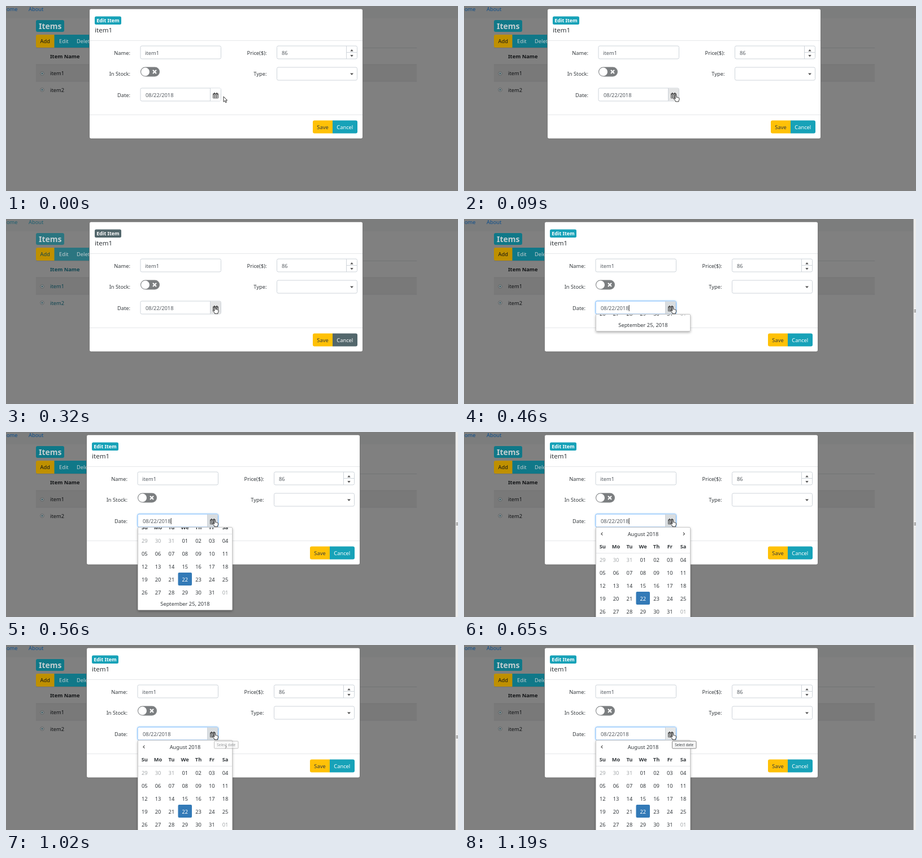
An HTML page that plays this animation: 800x329 px, repeating every 1270 ms.

```html
<!DOCTYPE html>
<html lang="en">
<head>
<meta charset="utf-8">
<title>Edit item dialog</title>
<style>
html, body { margin: 0; width: 100%; height: 100%; overflow: hidden; background: #808080; }
svg { display: block; width: 800px; height: 329px; font: 9.3px "Noto Sans", "Open Sans", sans-serif; fill: #34393d;
  --teal: #17a2b8; --dim: #107888; --link: #0d4e8c; --ink: #101214; }
svg.dull { --teal: #53676c; --dim: #2b7580; --link: #1d5f70; --ink: #0d4450; }
.mid { text-anchor: middle; }
.end { text-anchor: end; }
.bold { font-weight: 700; }
.page { fill: var(--ink); }
.teal { fill: var(--teal); }
.dim { fill: var(--dim); }
.link { fill: var(--link); }
.white { fill: #fff; }
.pale { fill: #c3ced1; }
.box { fill: #fff; stroke: #ced4da; }
.value { fill: #555b61; }
.line { stroke: #e5e7ea; fill: none; }
.stroke { fill: none; stroke: #444; stroke-width: 1.1; }
.other { fill: #a3a7aa; }
</style>
</head>
<body>
<svg id="stage" viewBox="0 0 800 329">
  <defs>
    <clipPath id="reveal"><rect id="window" x="233" y="170" width="168"/></clipPath>
    <filter id="shadow" x="-10%" y="-10%" width="120%" height="130%">
      <feDropShadow dx="0" dy="2" stdDeviation="2" flood-opacity=".3"/>
    </filter>
    <filter id="glow" x="-10%" y="-40%" width="120%" height="180%">
      <feDropShadow dx="0" dy="0" stdDeviation="1.5" flood-color="#66afe9" flood-opacity=".7"/>
    </filter>
  </defs>

  <g class="page">
    <rect width="800" height="22" fill="#7c7d7d"/>
    <text class="link end" x="20.5" y="9">Home</text>
    <text class="link" x="40" y="9">About</text>
    <rect class="dim" x="53" y="25" width="50" height="21" rx="3"/>
    <text class="pale bold" x="58" y="41" font-size="14">Items</text>
    <path class="dim" d="M85 51H160V74H85Z"/>
    <path fill="#bf9000" d="M56 51H85.5V74H56Q53 74 53 71V54Q53 51 56 51Z"/>
    <text x="60.5" y="66">Add</text>
    <text class="pale" x="94" y="66">Edit</text>
    <text class="pale" x="125" y="66">Delete</text>
    <rect x="53" y="104" width="674" height="30" fill="#797979"/>
    <path d="M53 74.5H727M53 104H727M53 134H727" stroke="#727375"/>
    <text class="bold" x="78" y="93">Item Name</text>
    <text x="78" y="123">item1</text>
    <text x="78" y="152.5">item2</text>
    <g fill="#8e9192" stroke="#535b5e" stroke-width=".8">
      <circle cx="64" cy="120" r="3.2"/><circle cx="64" cy="149" r="3.2"/>
    </g>
    <g fill="#34565f"><circle cx="64" cy="120" r="1.3"/><circle cx="64" cy="149" r="1.3"/></g>
  </g>

  <g id="edge">
    <rect x="795" width="5" height="329" fill="#ececec"/>
    <path d="M795.5 0V329" stroke="#aaa"/>
    <path d="M796.5 161.5H800M796.5 163.5H800M796.5 165.5H800" stroke="#777"/>
  </g>

  <g id="dialog">
    <rect x="147.5" y="5" width="484" height="231" rx="3" fill="#fff" stroke="#686868" stroke-width=".8"/>
    <path class="line" d="M148 61.5H631M148 193.5H631"/>
    <rect class="teal" x="157" y="18.5" width="47" height="14.5" rx="2.5"/>
    <text class="white bold mid" x="180.5" y="29" font-size="8.8">Edit Item</text>
    <text x="157" y="47" font-size="11.6">item1</text>
    <g class="end">
      <text x="220" y="86.5">Name:</text>
      <text x="220" y="124">In Stock:</text>
      <text x="220" y="161.5">Date:</text>
      <text x="461.5" y="86.5">Price($):</text>
      <text x="461.5" y="124">Type:</text>
    </g>
    <rect class="box" x="238" y="71" width="142.5" height="23" rx="2.5"/>
    <text class="value" x="246" y="86.5">item1</text>
    <rect class="box" x="479.5" y="71" width="142" height="23" rx="2.5"/>
    <path class="line" d="M602.5 71V94M603 82.5H621" style="stroke:#ced4da"/>
    <text class="value" x="488" y="86.5">86</text>
    <rect class="box" x="479.5" y="109" width="142" height="23" rx="2.5"/>
    <path fill="#555" d="M609.3 80.5L612 77L614.7 80.5ZM609.3 87L612 90.5L614.7 87ZM609 119.5H615L612 123Z"/>
    <rect x="238" y="108.5" width="34" height="17" rx="8.5" fill="#7b7e80"/>
    <circle class="white" cx="246.5" cy="117" r="7.5"/>
    <path d="M260 114L266 120M266 114L260 120" stroke="#fff" stroke-width="2.1"/>
    <rect id="date" class="box" x="238" y="146" width="142.5" height="23" rx="2.5"/>
    <rect id="pick" x="361.5" y="146.5" width="18.5" height="22"/>
    <path d="M361.5 146V169" stroke="#ced4da"/>
    <text class="value" x="247" y="161.5">08/22/2018</text>
    <path id="caret" d="M297.2 153V164" stroke="#222" stroke-width=".9"/>
    <g class="stroke" style="stroke-width:.9">
      <path d="M366.5 156H375.5V163.8H366.5ZM366.5 158.5H375.5M366.5 161.2H375.5M369.5 158.5V164M372.5 158.5V164"/>
      <path d="M366.5 156.5H375.5M368.8 154V157M373.2 154V157" stroke-width="1.6"/>
    </g>
    <path fill="#ffc107" d="M546 203.5H578V226.5H546Q543 226.5 543 223.5V206.5Q543 203.5 546 203.5Z"/>
    <path class="teal" d="M578 203.5H619Q622 203.5 622 206.5V223.5Q622 226.5 619 226.5H578Z"/>
    <text class="mid" x="560.5" y="218.5">Save</text>
    <text class="white mid" x="599.8" y="218.5">Cancel</text>
  </g>

  <g id="popup">
    <rect id="frame" x="233.5" y="169.5" width="167" rx="1.5" fill="#fff" stroke="#c8c8c8" filter="url(#shadow)"/>
    <g clip-path="url(#reveal)">
      <g id="calendar" class="mid">
        <path class="stroke" d="M245.3 178.7L242.9 181.2L245.3 183.7M388 178.7L390.4 181.2L388 183.7"/>
        <text x="317" y="184.7">August 2018</text>
        <path class="line" d="M234 215.5H400"/>
        <rect x="304.5" y="284" width="24.5" height="23" rx="2" fill="#337ab7"/>
        <text x="317" y="344.3" dy="-.9">September 25, 2018</text>
      </g>
    </g>
  </g>

  <g id="tip">
    <rect x="368.5" y="171" width="42.5" height="13" rx="1.2" fill="#f7f7f7" stroke="#777" stroke-width=".9"/>
    <text class="mid" x="389.7" y="179.9" font-size="6.4">Select date</text>
  </g>

  <g fill="#fff" stroke="#222" stroke-width=".9" stroke-linejoin="round">
    <path id="arrow" d="M0 0V9.4L2.2 7.4L3.8 10.8L5.4 10L3.8 6.8H6.6Z"/>
    <path id="hand" d="M-1 .8Q0 -.6 1 .8V4.3Q2.2 3.6 2.8 4.7Q4 4.1 4.5 5.2Q6 4.9 6 6.3V8.6L5 10.6V12H-.6V10.8L-3.7 7.2Q-3.9 5.7 -2.6 6L-1 7.4Z"/>
  </g>
</svg>
<script>
const $ = id => document.getElementById(id);
const LOOP = 1270, FULL = 181;
const steps = [0, 90, 160, 240, 320, 460, 560, 650, 780, 960, 1020, 1190];

function addText(x, y, text, cls) {
  const el = document.createElementNS("http://www.w3.org/2000/svg", "text");
  el.setAttribute("x", x);
  el.setAttribute("y", y);
  el.setAttribute("class", cls);
  el.textContent = text;
  $("calendar").append(el);
}

const colX = i => 245.3 + i * 23.8;
["Su", "Mo", "Tu", "We", "Th", "Fr", "Sa"].forEach((d, i) => addText(colX(i), 207.4, d, "bold"));
for (let i = 0; i < 35; i++) {
  const day = new Date(2018, 6, 29 + i);
  const cls = day.getMonth() !== 7 ? "other" : day.getDate() === 22 ? "white" : "";
  addText(colX(i % 7), 230.5 + Math.floor(i / 7) * 23, String(day.getDate()).padStart(2, "0"), cls);
}

const show = (id, on) => $(id).style.display = on ? "" : "none";
const move = (id, x, y) => $(id).setAttribute("transform", `translate(${x} ${y})`);

function draw(now) {
  const time = now % LOOP;
  const t = steps.findLast(s => s <= time);
  const open = t >= 460, hover = t >= 90;

  $("stage").classList.toggle("dull", t === 320);
  show("edge", open);
  move("dialog", open ? -5 : 0, 0);
  $("date").style.stroke = open ? "#80bdff" : "";
  $("date").style.filter = open ? "url(#glow)" : "";
  $("pick").style.fill = t >= 1190 ? "#e6e8e9" : open ? "#d9dde0" : hover ? "#e4e5e6" : "#fff";
  show("caret", open && t < 960);

  // The calendar slides down from behind the input, easing out.
  const p = Math.min(1, Math.max(0, (t - 442) / 208));
  const height = Math.round(FULL * (1 - (1 - p) ** 2));
  show("popup", open);
  $("frame").setAttribute("height", height);
  $("window").setAttribute("height", height);
  move("calendar", 0, height - FULL);

  $("tip").style.opacity = t >= 1190 ? 1 : t >= 1020 ? .5 : 0;

  show("arrow", !hover);
  show("hand", hover);
  move("arrow", 385, 161);
  move("hand", t === 90 ? 375 : open ? 369.5 : 370, t === 90 ? 158 : 156.3);
}

function tick(now) {
  draw(now);
  requestAnimationFrame(tick);
}
draw(0);
requestAnimationFrame(tick);
</script>
</body>
</html>
```
